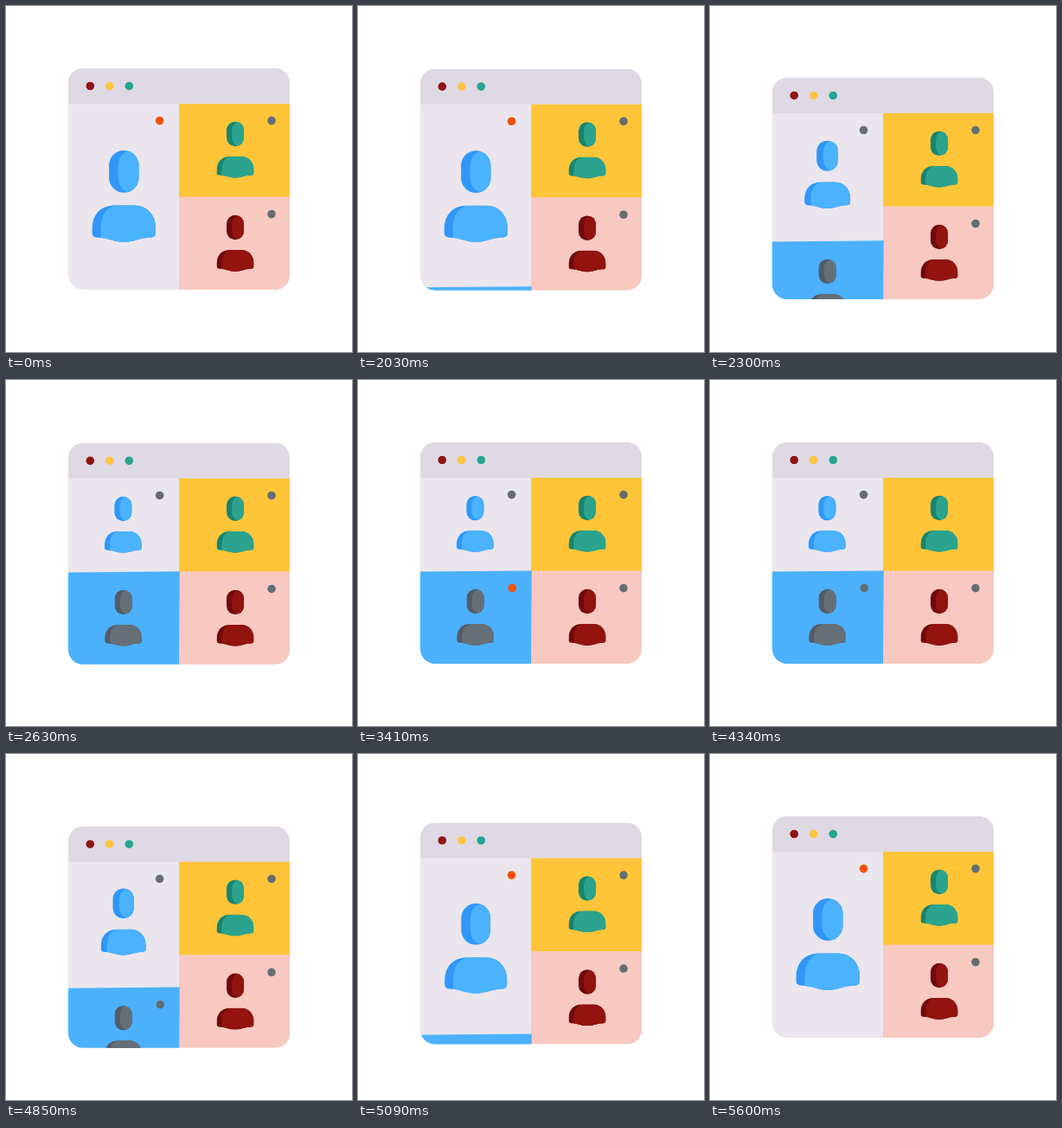
These frames come from a looping animation (400 by 400 pixels, 5660 ms). An HTML page:

```html
<!DOCTYPE html>
<html lang="en">
<head>
<meta charset="utf-8">
<title>Video call</title>
<style>
  html, body { margin: 0; width: 100%; height: 100%; overflow: hidden; background: #fff; }
  svg { display: block; width: 100%; height: 100%; }
</style>
</head>
<body>
<svg viewBox="0 0 400 400">
  <defs>
    <clipPath id="frame"><rect x="72" y="72" width="256" height="256" rx="17"/></clipPath>
    <clipPath id="headClip"><rect x="-17.2" width="34.4" height="48.8" rx="17"/></clipPath>
    <clipPath id="bodyClip"><path id="bodyShape" d="M-36.8 92C-36.8 74 -27 63.5 -10 63.5H12C27 63.5 36.8 75 36.8 90V95C36.8 99 35 100 32 100.5C17 101 11 106 0 106C-11 106 -17 101 -32 100.5C-35.5 100 -36.8 98 -36.8 95Z"/></clipPath>
  </defs>
  <g id="window">
    <g clip-path="url(#frame)">
      <rect x="72" y="72" width="256" height="256" fill="#ebe6ed"/>
      <rect x="72" y="72" width="256" height="41" fill="#dfd9e4"/>
      <rect x="200" y="113" width="128" height="108" fill="#ffc539"/>
      <rect x="200" y="220.6" width="128" height="107.4" fill="#f7c9c1"/>
      <g id="people"></g>
      <g id="guest"><path d="M72 221.6L200.8 220.4L200 329H72Z" fill="#4bb1fd"/></g>
      <g id="dots"></g>
    </g>
  </g>
</svg>
<script>
const LOOP = 5660, STEP = 30, PHASE = 20;
const OPEN = 2000, CLOSE = 4670, SLIDE = 490;
const GREY = '#636e73', ORANGE = '#f4500b';
const SMALL = 0.583, GAP = 3.3;

const $ = id => document.getElementById(id);
const clamp = v => Math.max(0, Math.min(1, v));
const ease = u => (1 - Math.cos(Math.PI * clamp(u))) / 2;
const mix = (a, b, u) => a + (b - a) * u;

function add(parent, tag, attrs) {
  const el = document.createElementNS('http://www.w3.org/2000/svg', tag);
  for (const key in attrs) el.setAttribute(key, attrs[key]);
  return parent.appendChild(el);
}

function dot(parent, cx, cy, fill) {
  return add(parent, 'circle', { cx, cy, r: 4.8, fill });
}

// Returns a function that places the figure; gap is extra head-to-body space in pixels
function person(parent, light, dark) {
  const root = add(parent, 'g', {});
  const head = add(root, 'g', { 'clip-path': 'url(#headClip)' });
  add(head, 'rect', { x: -18, y: -1, width: 36, height: 51, fill: dark });
  add(head, 'rect', { x: -6.8, y: 0.6, width: 60, height: 47.6, rx: 14, ry: 18, fill: light });
  const shift = add(root, 'g', {});
  const body = add(shift, 'g', { 'clip-path': 'url(#bodyClip)' });
  add(body, 'rect', { x: -38, y: 62, width: 76, height: 46, fill: dark });
  add(body, 'path', { d: 'M-26.8 110V90C-26.8 75 -20 65 -8 63H60V110Z', fill: light });
  return (x, y, scale, gap) => {
    root.setAttribute('transform', `translate(${x} ${y}) scale(${scale})`);
    shift.setAttribute('transform', `translate(0 ${gap / scale})`);
  };
}

['#8f1512', '#ffc542', '#26a592'].forEach((c, i) => dot($('dots'), 97.3 + 22.5 * i, 92.5, c));

const placeHost = person($('people'), '#4bb2fd', '#2f97f8');
person($('people'), '#2ba38f', '#18846f')(265, 133.7, SMALL, GAP);
person($('people'), '#92130f', '#6f0a09')(265, 241.8, SMALL, GAP);
person($('guest'), '#656f78', '#545b66')(135.7, 241.8, SMALL, GAP);

const hostDot = dot($('dots'), 177.6, 132.6, ORANGE);
const topDot = dot($('dots'), 307, 132.6, GREY);
dot($('dots'), 307, 240.6, GREY);
const guestDot = dot($('guest'), 178.3, 240.6, GREY);

const within = (t, a, b) => t >= a && t < b;

// Quick drop, slower return
const dip = t => 12 * ease(t / 200) * (1 - ease((t - 200) / 520));
const nudge = t => 3.3 * Math.sin(Math.PI * clamp((t - 3770) / 570)) ** 2;

function slide(t) {
  const u = clamp(t / SLIDE);
  return mix(u, ease(u), 0.3);
}

function draw(t) {
  const drop = dip(t - OPEN) + dip(t - CLOSE) + nudge(t);
  $('window').setAttribute('transform', `translate(0 ${drop})`);

  const grid = ease((t - OPEN) / SLIDE) - ease((t - CLOSE) / SLIDE);
  placeHost(mix(136.3, 135.4, grid), mix(167, 133.9, grid), mix(1, SMALL, grid), GAP * grid);

  const shown = slide(t - OPEN) - slide(t - CLOSE);
  $('guest').setAttribute('transform', `translate(0 ${108 * (1 - shown)})`);

  hostDot.setAttribute('fill', within(t, 2300, 4940) ? GREY : ORANGE);
  guestDot.setAttribute('fill', within(t, 2810, 4070) ? ORANGE : GREY);
  guestDot.setAttribute('visibility', t >= 2810 ? 'visible' : 'hidden');
  topDot.setAttribute('visibility', within(t, 4340, 4520) ? 'hidden' : 'visible');
}

const start = performance.now();
function tick() {
  const t = (performance.now() - start) % LOOP;
  draw(Math.max(0, Math.floor((t - PHASE) / STEP) * STEP + PHASE));
  requestAnimationFrame(tick);
}
tick();
</script>
</body>
</html>
```
